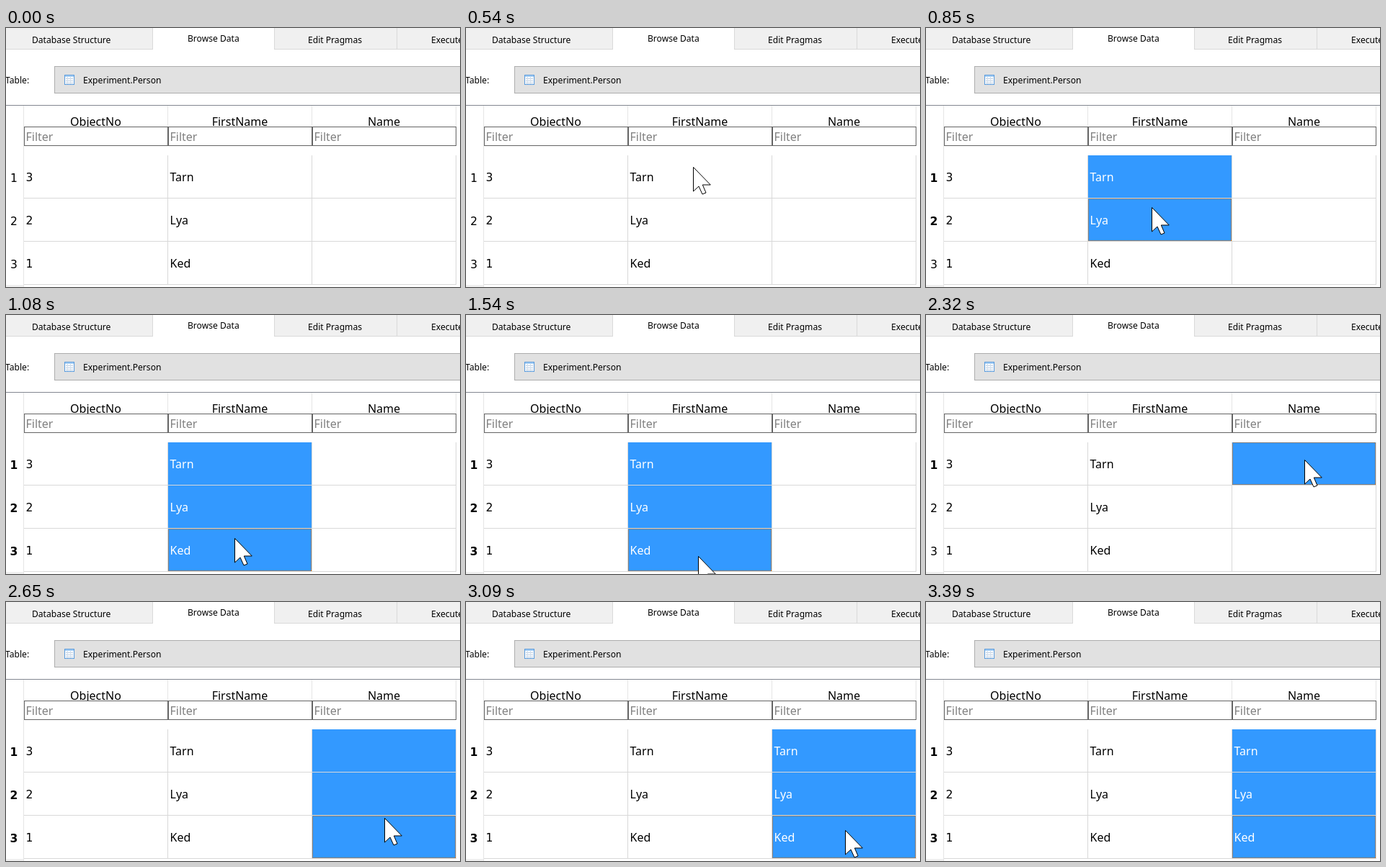
An HTML page that plays this animation: 630 px wide and 360 px high, repeating every 4.72 s.

```html
<!DOCTYPE html>
<html lang="en">
<head>
<meta charset="utf-8">
<title>Copying a column</title>
<style>
  html, body { margin: 0; width: 100%; height: 100%; overflow: hidden; background: #fff; }
  svg { display: block; }
  text { font: 16px "Noto Sans", "Open Sans", sans-serif; }
  .small { font-size: 12.1px; }
  .digit { font: 15.5px "DejaVu Sans", sans-serif; }
  rect { shape-rendering: crispEdges; }
</style>
</head>
<body>
<svg id="stage" width="630" height="360" viewBox="0 0 630 360"></svg>
<script>
const LOOP = 4720;
const FPS = 13;
const COPY_DRAG = 10, PASTE_DRAG = 30, PASTE = 40;
const NAMES = ["Tarn", "Lya", "Ked"];
const TOP = 177, ROW = 60, LEFT = 25, COLUMN = 200;
const GRID = "#d8d8d8", PALE = "#e5e5e5", TAB_EDGE = "#d9d9d9";
const stage = document.getElementById("stage");

function add(tag, attrs, content = "") {
  const node = document.createElementNS("http://www.w3.org/2000/svg", tag);
  for (const key in attrs) node.setAttribute(key, attrs[key]);
  node.textContent = content;
  return stage.appendChild(node);
}
const box = (x, y, width, height, fill) => add("rect", { x, y, width, height, fill });
const frame = (x, y, width, height, fill, stroke, attrs = {}) =>
  add("rect", { x: x + .5, y: y + .5, width: width - 1, height: height - 1, fill, stroke, ...attrs });
const label = (x, y, content, attrs = {}) => add("text", { x, y, ...attrs }, content);
const small = (x, y, content) => label(x, y, content, { class: "small" });
const show = (node, visible) => node.setAttribute("visibility", visible ? "visible" : "hidden");

const columnX = col => LEFT + COLUMN * col;
const rowY = row => TOP + ROW * row;

// Tab bar
for (const [x, width] of [[0, 204], [372, 258]]) {
  box(x, 0, width, 29, "#f0f0f0");
  box(x, 29, width, 1, TAB_EDGE);
}
for (const x of [203, 372, 542]) box(x, 0, 1, 30, TAB_EDGE);
small(36, 21, "Database Structure");
small(252, 19, "Browse Data");
small(419, 21, "Edit Pragmas");
small(590, 21, "Execute SQL");

// Table chooser
small(-1, 77, "Table:");
frame(67, 53, 570, 38, "#e1e1e1", "#adadad");
frame(81, 65, 14, 14, "#fff", "#5a9bdc");
box(82, 66, 12, 2, "#a9d0f5");
for (let y = 70; y < 78; y += 3) box(83, y, 10, 1, "#b9cbe0");
for (let x = 85; x < 93; x += 4) box(x, 68, 1, 10, "#d3dfec");
small(107, 77, "Experiment.Person");

// Column headers, filters and vertical rules
box(0, 107, 630, 1, "#828790");
box(24, 108, 1, 252, PALE);
["ObjectNo", "FirstName", "Name"].forEach((title, col) => {
  const x = columnX(col), edge = x + COLUMN - 1;
  box(edge, 108, 1, 29, PALE);
  box(edge, TOP, 1, 3 * ROW, GRID);
  label(x + 99.5, 136, title, { "text-anchor": "middle" });
  frame(x, 137, COLUMN, 27, "#fff", "#646464");
  label(x + 2.5, 157, "Filter", { fill: "#808080" });
});

// Rows
box(0, 357, 24, 3, "#f0f0f0");
const rows = NAMES.map((name, row) => {
  const y = rowY(row);
  box(LEFT, y + ROW - 1, 3 * COLUMN, 1, GRID);
  const number = label(11, y + 37, row + 1, { class: "digit", "text-anchor": "middle" });
  label(27.5, y + 36, 3 - row, { class: "digit" });
  const cells = [1, 2].map(col => {
    const x = columnX(col), size = [COLUMN - 1, ROW - 1];
    return {
      col,
      fill: box(x, y, ...size, "#3399ff"),
      focus: frame(x, y, ...size, "none", "#cc6600", { "stroke-dasharray": "1 1" }),
      text: label(x + 2.5, y + 36, name)
    };
  });
  return { number, cells };
});

const pointer = add("path", {
  d: "M0 0V33.5L7.5 26.5L12.5 37.5L17.5 35.5L12.8 24.5H23.8Z",
  fill: "#fff", stroke: "#000"
});

// Stops of the pointer: [recorded frame, x, y]
const STOPS = [
  [1, 505, 390], [8, 310, 188], [COPY_DRAG, 310, 188], [11, 313, 249], [17, 319, 335],
  [20, 322, 335], [25, 509, 285], [26, 527, 264], [PASTE_DRAG, 525, 201],
  [34, 525, 300], [37, 526, 317], [PASTE, 526, 317], [44, 549, 362]
];

function pointerAt(step) {
  const next = STOPS.findIndex(stop => stop[0] > step);
  if (next < 1) return STOPS.at(next).slice(1);
  const [from, x0, y0] = STOPS[next - 1];
  const [to, x1, y1] = STOPS[next];
  const eased = Math.sin((step - from) / (to - from) * Math.PI / 2);
  return [x0 + (x1 - x0) * eased, y0 + (y1 - y0) * eased].map(Math.round);
}

function render(time) {
  const step = Math.floor((time + 5) * FPS / 1000);
  const [x, y] = step < STOPS[0][0] ? STOPS[0].slice(1) : pointerAt(step);
  pointer.setAttribute("transform", `translate(${x + .5} ${y + .5})`);

  // A drag selects from the first row down to the row under the pointer.
  const column = step >= PASTE_DRAG ? 2 : 1;
  const dragging = step >= COPY_DRAG;
  const released = step >= 17 && step < PASTE_DRAG;
  const reached = released ? 2 : Math.min(2, Math.floor((y - TOP) / ROW));
  const last = dragging ? reached : -1;

  rows.forEach(({ number, cells }, row) => {
    number.style.fontWeight = row <= last ? "bold" : "normal";
    for (const { col, fill, focus, text } of cells) {
      const selected = col === column && row <= last;
      show(fill, selected);
      show(focus, selected && row === last);
      show(text, col === 1 || step >= PASTE);
      text.setAttribute("fill", selected ? "#fff" : "#000");
    }
  });
}

const start = performance.now();
function tick() {
  render((performance.now() - start) % LOOP);
  requestAnimationFrame(tick);
}
tick();
</script>
</body>
</html>
```
